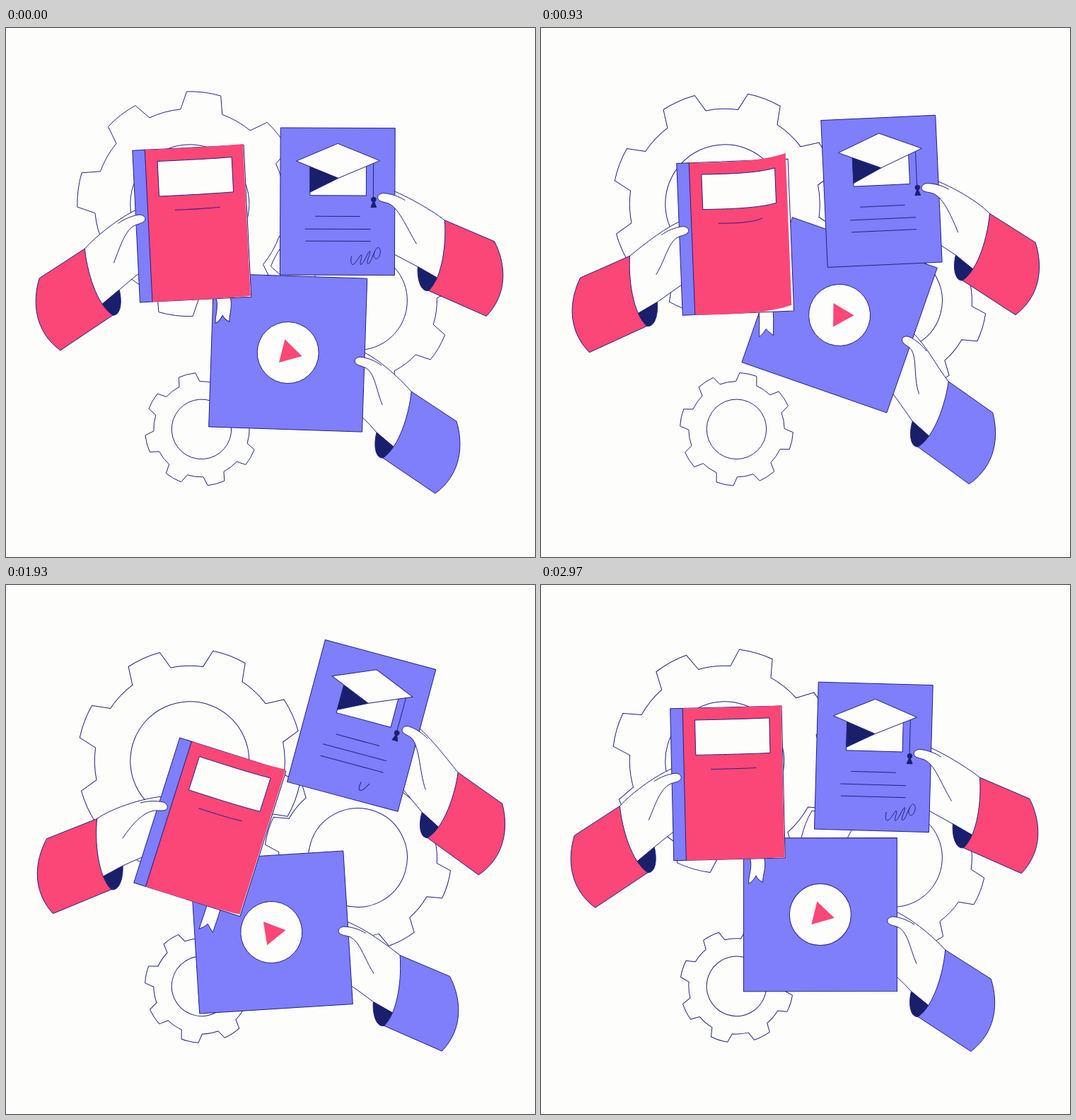
Recreate the animation shown at these times as an HTML page. Size 748 by 748 pixels, loop 3010 ms.

```html
<!DOCTYPE html>
<html lang="en">
<head>
<meta charset="utf-8">
<title>Learning tools</title>
<style>
  html, body { margin: 0; width: 100%; height: 100%; overflow: hidden; background: #fdfdfc; }
  svg { display: block; width: 100vw; height: 100vh; }
  svg * { vector-effect: non-scaling-stroke; }
  .line, .white, .violet, .pink, .navy { stroke: #23237f; stroke-width: 1; stroke-linejoin: round; }
  .line { fill: none; }
  .white { fill: #fdfdfc; }
  .violet { fill: #7f7efb; }
  .pink { fill: #fb4778; }
  .navy { fill: #1a1f6b; }
  .flat { stroke: none; }
</style>
</head>
<body>
<svg viewBox="0 0 748 748">
  <g id="gears"></g>

  <g id="videoBack"></g>
  <g id="video">
    <rect class="violet" x="-108.5" y="-108.5" width="217" height="217"/>
    <circle class="white" r="43.5"/>
  </g>
  <path id="play" class="pink flat" d="M19.5 0L-9.8 16.8V-16.8Z"/>
  <g id="videoFront"></g>

  <g id="bookBack"></g>
  <g id="book">
    <path id="ribbon" class="white"/>
    <rect class="white" x="17.5" width="140" height="215"/>
    <path id="cover" class="pink flat"/>
    <path id="label" class="white"/>
    <path id="title" class="line"/>
    <rect class="violet" width="17.5" height="215"/>
  </g>
  <g id="bookFront"></g>

  <g id="diplomaBack"></g>
  <g id="diploma">
    <rect class="violet" width="162" height="208"/>
    <path class="white" d="M42 54H121.5V95.5H42Z"/>
    <path class="navy" d="M42 54L82 71L42 91Z"/>
    <path class="white" d="M81 22L140.5 46L82 71L22.5 47Z"/>
    <path class="line" d="M131.5 50V98M49.5 125H113M35 143H128M36 160H128"/>
    <circle class="navy" cx="132" cy="101" r="3.4"/>
    <path class="navy" d="M132 102L136 112H128Z"/>
    <path id="sign" class="line" pathLength="1" d="M101 181C100 188 100 193 103 193C108 192 112 180 115 179C117 181 112 191 114 193C118 193 124 175 127 174C129 176 121 190 124 192C129 193 132 172 138 169C143 168 143 180 138 184C133 187 131 180 134 174"/>
  </g>
  <g id="diplomaFront"></g>
</svg>

<script>
const LOOP = 3010, STEP = 100 / 3, CYCLE = 90;
const $ = id => document.getElementById(id);
const rad = deg => deg * Math.PI / 180;
const clamp = v => Math.min(1, Math.max(0, v));

// Everything sways as one sine per cycle: middle, swing, beat of the maximum
const wave = (mid, swing, peak) => beat => mid + swing * Math.cos(2 * Math.PI * (beat - peak) / CYCLE);
const still = value => () => value;

const video = { x: wave(396.8, 27.3, 22.5), y: wave(455.5, 51.1, 69.5), a: wave(4.9, 14.4, 26.5) };
const book = { x: wave(207.4, 38.5, 56.5), y: wave(194.4, 23.4, 52.3), a: wave(4.9, 12.7, 59.1) };
const diploma = { x: wave(413.9, 37.5, 57.7), y: wave(114.4, 37, 12), a: wave(4.9, 10.5, 61.9) };
const playTilt = wave(1.75, 13, 4.5);
const coverLift = wave(3.8, 4.7, 31);
const ribbonSway = wave(-1.4, 1.6, 45);

// side mirrors the arm; grip and slide place the thumb on the held object
const arms = [
  { id: 'video', held: video, side: 1, sleeve: 'violet', crease: [-90, -74], rest: -1.5,
    grip: 95, slide: wave(5.5, 3.8, 84),
    x: still(622), y: wave(603.1, 8.9, 75.3), a: wave(-3.25, 7.35, 16.7) },
  { id: 'book', held: book, side: -1, sleeve: 'pink', crease: [-90, -73], rest: 2.3,
    grip: 13, slide: wave(98, 2.6, 66),
    x: still(62), y: wave(407.7, 4, 57), a: wave(7.15, 6.9, 45.6) },
  { id: 'diploma', held: diploma, side: 1, sleeve: 'pink', crease: [-94, -67], rest: -4,
    grip: 138, slide: wave(98, 4.7, 22),
    x: still(685), y: wave(356.4, 3.2, 60), a: wave(-3.05, 7.2, 46.4) }
];

// "a" points follow the arm, "h" points follow the thumb tip
const PALM = 'Ma-49,-93 Ca-66,-112 h30,-8 h0,-18 Lh-3,68 Qh12,78 a-98,-35 La-73,-14 La-35,-50Z';
const CUFF = 'Ma-73,-14 La-98,-35 Ca-102,-20 a-101,0 a-90,1 Ca-83,2 a-77,-6 a-73,-14Z';
const SLEEVE = 'Ma-49,-93 La15,-51 Ca25,-18 a22,24 a-15,51 La-89,1 Ca-66,-14 a-52,-62 a-49,-93Z';
const thumbShape = ([x, y]) =>
  `Mh38,6 Ch30,0 h18,-5 h8,-6 Ch2,-6 h-1,-2 h0,1 Ch1,5 h6,6 h12,8 Ch28,13 a${x - 10},${y - 25} a${x},${y}`;

const gears = [
  { x: 497.5, y: 385.5, size: 0.832, from: 25.8, turn: 4.5 },
  { x: 259.8, y: 248.8, size: 1, from: 11.75, turn: -4.5 },
  { x: 276.5, y: 567.3, size: 0.503, from: -21, turn: 6 }
];

function add(parent, tag, attrs) {
  const el = document.createElementNS('http://www.w3.org/2000/svg', tag);
  for (const k in attrs) el.setAttribute(k, attrs[k]);
  return parent.appendChild(el);
}

function gearPath() {
  const at = (deg, r) => `${(r * Math.sin(rad(deg))).toFixed(2)} ${(-r * Math.cos(rad(deg))).toFixed(2)}`;
  let d = '';
  for (let k = 0; k < 8; k++) {
    const c = k * 45;
    d += `${k ? 'A134.5 134.5 0 0 1' : 'M'}${at(c - 12.75, 134.5)}L${at(c - 8.8, 159)}` +
         `A159 159 0 0 1 ${at(c + 8.8, 159)}L${at(c + 12.75, 134.5)}`;
  }
  return d + `A134.5 134.5 0 0 1 ${at(-12.75, 134.5)}Z`;
}

for (const g of gears) {
  g.el = add($('gears'), 'g', {});
  add(g.el, 'path', { class: 'white', d: gearPath() });
  add(g.el, 'circle', { class: 'line', r: 84 });
}
for (const arm of arms) {
  const back = $(arm.id + 'Back');
  arm.parts = [
    [add(back, 'path', { class: 'white' }), PALM],
    [add(back, 'path', { class: 'navy' }), CUFF],
    [add(back, 'path', { class: arm.sleeve }), SLEEVE],
    [add($(arm.id + 'Front'), 'path', { class: 'white' }), thumbShape(arm.crease)]
  ];
}

const pose = (o, beat) => ({ x: o.x(beat), y: o.y(beat), a: o.a(beat) });

function place(el, { x, y, a }, size = 1) {
  el.setAttribute('transform', `translate(${x} ${y}) rotate(${a}) scale(${size})`);
}

function mapper({ x, y, a }, side = 1) {
  const c = Math.cos(rad(a)), s = Math.sin(rad(a));
  return (px, py) => [x + side * (px * c - py * s), y + px * s + py * c];
}

function drawArm(arm, beat) {
  const base = pose(arm, beat), held = pose(arm.held, beat), side = arm.side;
  const [x, y] = mapper(held)(arm.grip, arm.slide(beat));
  const map = {
    a: mapper({ ...base, a: side * base.a }, side),
    h: mapper({ x, y, a: side * (held.a + arm.rest) }, side)
  };
  for (const [el, shape] of arm.parts) {
    el.setAttribute('d', shape.replace(/([ah])(-?[\d.]+),(-?[\d.]+)/g,
      (_, k, px, py) => map[k](+px, +py).map(n => n.toFixed(2)).join(' ')));
  }
}

function drawBook(beat) {
  const lift = Math.max(0, coverLift(beat)), s = ribbonSway(beat);
  // Strip between two heights whose right end bends upward
  const bent = (x0, x1, y0, y1, rise) => {
    const up = rise * lift, dip = up * 0.2, end = x1 - 0.3 * up;
    const near = x0 + (x1 - x0) * 0.4, far = x0 + (x1 - x0) * 0.75;
    const top = `M${x0} ${y0}C${near} ${y0 + dip} ${far} ${y0 + dip} ${end} ${y0 - up}`;
    return y1 === y0 ? top
      : top + `L${end} ${y1 - up}C${far} ${y1 + dip} ${near} ${y1 + dip} ${x0} ${y1}Z`;
  };
  $('cover').setAttribute('d', bent(17.5, 157, 0, 215, 1));
  $('label').setAttribute('d', bent(34.5, 140, 17, 66.5, 0.6));
  $('title').setAttribute('d', bent(55.5, 120, 87, 87, 0.6));
  $('ribbon').setAttribute('d',
    `M108 205V215C${108 - s} 228 ${108 + s} 238 ${108 + s} 249.5` +
    `Q${113 + s} ${246 - s} ${117.5 + s * 0.6} 239Q${121 + s} ${242 - s} ${128 + s} 248.5` +
    `C${128 + s} 238 ${128 - s} 228 128 215V205Z`);
}

// The signature is wiped early in the cycle and written again later
function drawSign(beat) {
  const ink = clamp(Math.max((25 - beat) / 22, (beat - 54) / 20));
  $('sign').setAttribute('stroke-dasharray', `${ink} 2`);
  $('sign').setAttribute('visibility', ink > 0.01 ? 'visible' : 'hidden');
}

function draw(ms) {
  const step = Math.min(CYCLE - 1, Math.floor((ms + 3.4) / STEP));
  // Starts one beat ahead and loses it again in the first third
  const beat = step + 1 - clamp((step - 13) / 15);

  for (const g of gears) place(g.el, { x: g.x, y: g.y, a: g.from + g.turn * beat }, g.size);

  const v = pose(video, beat);
  place($('video'), v);
  place($('play'), { x: v.x + 1, y: v.y, a: playTilt(beat) });
  place($('book'), pose(book, beat));
  place($('diploma'), pose(diploma, beat));
  drawBook(beat);
  drawSign(beat);
  for (const arm of arms) drawArm(arm, beat);
}

const start = performance.now();
function tick() {
  draw((performance.now() - start) % LOOP);
  requestAnimationFrame(tick);
}
tick();
</script>
</body>
</html>
```
